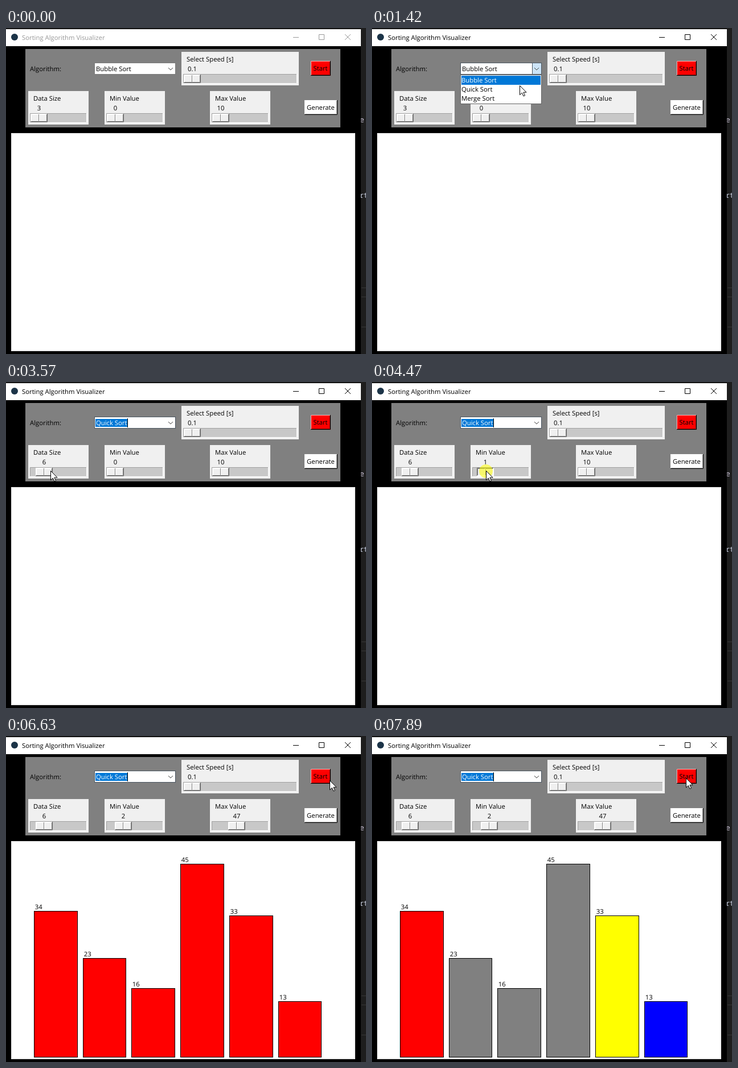
Recreate the animation shown at these times as an HTML page. Size 632 px wide and 574 px high, loop 8000 ms.

```html
<!DOCTYPE html>
<html lang="en">
<head>
<meta charset="utf-8">
<title>Sorting Algorithm Visualizer</title>
<style>
html, body { margin: 0; width: 100%; height: 100%; overflow: hidden; background: #1e1e1e; }
svg { display: block; width: 632px; height: 574px; }
text { font: 11.3px "Open Sans", "Noto Sans", sans-serif; text-rendering: geometricPrecision; white-space: pre; }
.code { font: 13px "Noto Sans Mono", monospace; }
</style>
</head>
<body>
<svg id="stage" viewBox="0 0 632 574" xmlns="http://www.w3.org/2000/svg"></svg>
<script>
const LOOP = 8000;
const BLUE = '#0078d7', FACE = '#f0f0f0', EDGE = '#4a5560';
const stage = document.getElementById('stage');

function set(el, attrs) {
  for (const k in attrs) el.setAttribute(k, attrs[k]);
}
function add(parent, tag, attrs, content) {
  const el = document.createElementNS('http://www.w3.org/2000/svg', tag);
  set(el, attrs);
  if (content !== undefined) el.textContent = content;
  parent.appendChild(el);
  return el;
}
const group = () => add(stage, 'g', {});
const rect = (p, x, y, width, height, fill) => add(p, 'rect', { x, y, width, height, fill });
const text = (p, x, y, s, fill = '#000') => add(p, 'text', { x, y, fill }, s);
const line = (p, d, stroke) => add(p, 'path', { d, stroke, fill: 'none' });
const show = (el, on) => el.setAttribute('display', on ? 'inline' : 'none');

// Two-tone edge: light on top and left, dark on bottom and right.
function bevel(p, x, y, w, h, light, dark) {
  const a = line(p, `M${x + .5} ${y + h - 1}V${y + .5}H${x + w - 1}`, light);
  const b = line(p, `M${x} ${y + h - .5}H${x + w - .5}V${y}`, dark);
  return sunken => {
    a.setAttribute('stroke', sunken ? dark : light);
    b.setAttribute('stroke', sunken ? light : dark);
  };
}

function makeScale(x, y, w, label, min, span) {
  rect(stage, x, y, w, 59, FACE);
  text(stage, x + 9, y + 17, label);
  rect(stage, x + 3, y + 39, w - 6, 17, '#c8c8c8');
  bevel(stage, x + 3, y + 39, w - 6, 17, '#a0a0a0', '#fff');
  const value = text(stage, 0, y + 34, '');
  value.setAttribute('text-anchor', 'middle');
  const knob = group();
  rect(knob, 0, 0, 30, 15, FACE);
  const edges = [
    bevel(knob, 0, 0, 30, 15, '#fff', '#696969'),
    bevel(knob, 1, 1, 14, 13, '#fff', '#808080'),
    bevel(knob, 15, 1, 14, 13, '#fff', '#808080')
  ];
  return (v, pressed) => {
    const at = x + 4 + Math.floor((v - min) / span * 70 + .01);
    knob.setAttribute('transform', `translate(${at} ${y + 40})`);
    value.setAttribute('x', at + 15);
    value.textContent = v;
    edges.forEach(edge => edge(pressed));
  };
}

function makeButton(x, y, w, h, label, fill, light, dark) {
  const face = rect(stage, x, y, w, h, fill);
  const outer = bevel(stage, x, y, w, h, light, '#000');
  const inner = bevel(stage, x + 1, y + 1, w - 2, h - 2, fill, dark);
  text(stage, x + w / 2 - .5, y + 17, label).setAttribute('text-anchor', 'middle');
  return pressed => {
    face.setAttribute('fill', pressed ? FACE : fill);
    outer(pressed);
    inner(pressed);
  };
}

// Editor strip behind the window
rect(stage, 0, 0, 632, 574, '#1e1e1e');
for (const y of [457, 473, 526]) rect(stage, 624, y, 8, 1, '#383838');
text(stage, 621, 166, 'e', '#d0c8dc').setAttribute('class', 'code');
text(stage, 620, 299, 'rt', '#c4cbdc').setAttribute('class', 'code');

// Window and title bar
rect(stage, 0, 1, 623, 573, '#000');
rect(stage, 0, 2, 623, 30, '#fff');
add(stage, 'circle', { cx: 15, cy: 16, r: 6, fill: '#1c3448' });
const title = text(stage, 28, 21, 'Sorting Algorithm Visualizer');
const controls = line(stage, 'M504 16.5H514M549.5 11.5H558.5V20.5H549.5ZM595 11L605 21M605 11L595 21', '#000');

// Control panel
rect(stage, 34, 37, 553, 138, '#808080');
text(stage, 42, 76, 'Algorithm:');
const setSpeed = makeScale(308, 42, 206, 'Select Speed [s]', .1, 1.9);
const setSize = makeScale(39, 111, 106, 'Data Size', 3, 22);
const setMin = makeScale(173, 111, 106, 'Min Value', 0, 10);
const setMax = makeScale(358, 111, 106, 'Max Value', 10, 90);
const pressStart = makeButton(535, 58, 35, 26, 'Start', '#f00', '#ffb4b4', '#900000');
const pressGenerate = makeButton(524, 127, 58, 26, 'Generate', '#fff', '#fff', '#a0a0a0');

// Combobox
const comboEdge = rect(stage, 155, 61, 143, 21, '#7a7a7a');
rect(stage, 156, 62, 141, 19, '#fff');
const comboButton = add(stage, 'rect', { x: 281.5, y: 61.5, width: 16, height: 20, fill: '#cce4f7', stroke: EDGE });
line(stage, 'M285 70L289 74L293 70', '#404040');
const comboMark = rect(stage, 157, 65, 56, 14, BLUE);
const comboText = text(stage, 158, 76, '');
const caret = rect(stage, 213, 64, 1, 16, '#000');

// Drop-down list
const list = group();
rect(list, 155, 82, 143, 52, '#646464');
rect(list, 156, 83, 141, 50, '#fff');
const listMark = rect(list, 157, 84, 139, 16, BLUE);
const items = ['Bubble Sort', 'Quick Sort', 'Merge Sort'].map((s, i) => text(list, 157, 96 + 16 * i, s));

// Chart
rect(stage, 9, 185, 604, 384, FACE);
rect(stage, 11, 187, 600, 380, '#fff');
const chart = group();
const data = [34, 23, 16, 45, 33, 13];
const bars = data.map((v, i) => {
  const step = 600 / (data.length + 1);
  const left = Math.round(49 + i * step), right = Math.round(39 + (i + 1) * step);
  const top = Math.round(565 - v / Math.max(...data) * 340);
  const bar = add(chart, 'rect', {
    x: left + .5, y: top + .5, width: right - left, height: 565 - top, stroke: '#000'
  });
  text(chart, left + 1.7, top - 3, v);
  return bar;
});

// Pointer
const pointer = group();
const halo = add(pointer, 'circle', { cx: 0, cy: 1, r: 12, fill: '#ff0', 'fill-opacity': .55 });
add(pointer, 'path', {
  d: 'M.5 .5V16.8L4.3 13.2L7 19L9.5 17.9L6.9 12.2H12Z', fill: '#fff', stroke: '#000'
});

// Pointer moves: start, end, x, y; it rests in between
const moves = [
  [40, 650, 288, 72],     // combobox
  [850, 1540, 256, 104],  // second list item
  [1830, 2440, 157, 160],
  [2440, 2600, 68, 157],  // data size knob
  [3050, 3370, 77.6, 156],
  [3570, 4270, 192, 155], // min knob
  [4330, 4590, 206, 156],
  [4710, 4960, 438, 162],
  [4960, 5160, 374, 156], // max knob
  [5200, 5490, 400.5, 155],
  [5720, 5800, 402.8, 155],
  [5850, 6150, 553, 140], // generate
  [6290, 6590, 568, 78],
  [6640, 6870, 551, 74]   // start
];

const ease = u => u * u * (3 - 2 * u);

function pointerAt(t) {
  let x = 583, y = 564;
  for (const [from, to, nx, ny] of moves) {
    if (t <= from) break;
    const u = ease(Math.min(1, (t - from) / (to - from)));
    x += (nx - x) * u;
    y += (ny - y) * u;
  }
  return [x, y];
}

// Times the mouse button is held
const holds = {
  open: [810, 930], pick: [1750, 1830], size: [2880, 3570], min: [4310, 4700],
  max: [5200, 5850], generate: [6190, 6290], start: [7160, 7300]
};
const held = (t, name) => t >= holds[name][0] && t < holds[name][1];

function drag(t, name, setter, min, span) {
  const [from, to] = holds[name];
  const x0 = pointerAt(from)[0];
  const x = pointerAt(Math.min(Math.max(t, from), to))[0];
  setter(min + Math.round((x - x0) * span / 70), held(t, name));
}

// First partition pass: border red, scanned bar yellow, pivot blue
function barColor(i, t) {
  if (i === 0 || t < 7340) return '#f00';
  if (i === data.length - 1) return '#00f';
  return i === Math.floor((t - 7450) / 110) ? '#ff0' : '#808080';
}

function draw(t) {
  const [x, y] = pointerAt(t);
  const active = t >= 810, picked = t >= 1810, open = t >= 850 && !picked;
  const hover = !picked && (open || (x < 298 && y > 61 && y < 82));

  title.setAttribute('fill', active ? '#000' : '#999');
  controls.setAttribute('stroke', active ? '#000' : '#999');

  comboEdge.setAttribute('fill', hover || picked ? EDGE : '#7a7a7a');
  show(comboButton, hover);
  show(comboMark, picked);
  comboText.textContent = picked ? 'Quick Sort' : 'Bubble Sort';
  comboText.setAttribute('fill', picked ? '#fff' : '#000');
  // The blink stops once sorting blocks the window
  show(caret, picked && (t > 7170 || (t - 1770) % 900 < 600));

  show(list, open);
  const row = y > 102 ? 1 : 0;
  listMark.setAttribute('y', 84 + 16 * row);
  items.forEach((item, i) => item.setAttribute('fill', i === row ? '#fff' : '#000'));

  setSpeed(.1, false);
  drag(t, 'size', setSize, 3, 22);
  drag(t, 'min', setMin, 0, 10);
  drag(t, 'max', setMax, 10, 90);
  pressGenerate(held(t, 'generate'));
  pressStart(held(t, 'start'));

  show(chart, t >= 6280);
  bars.forEach((bar, i) => bar.setAttribute('fill', barColor(i, t)));

  show(pointer, t >= 40);
  show(halo, Object.keys(holds).some(name => held(t, name)));
  pointer.setAttribute('transform', `translate(${Math.round(x)} ${Math.round(y)})`);
}

const begin = performance.now();
function tick() {
  draw((performance.now() - begin) % LOOP);
  requestAnimationFrame(tick);
}
draw(0);
requestAnimationFrame(tick);
</script>
</body>
</html>
```
